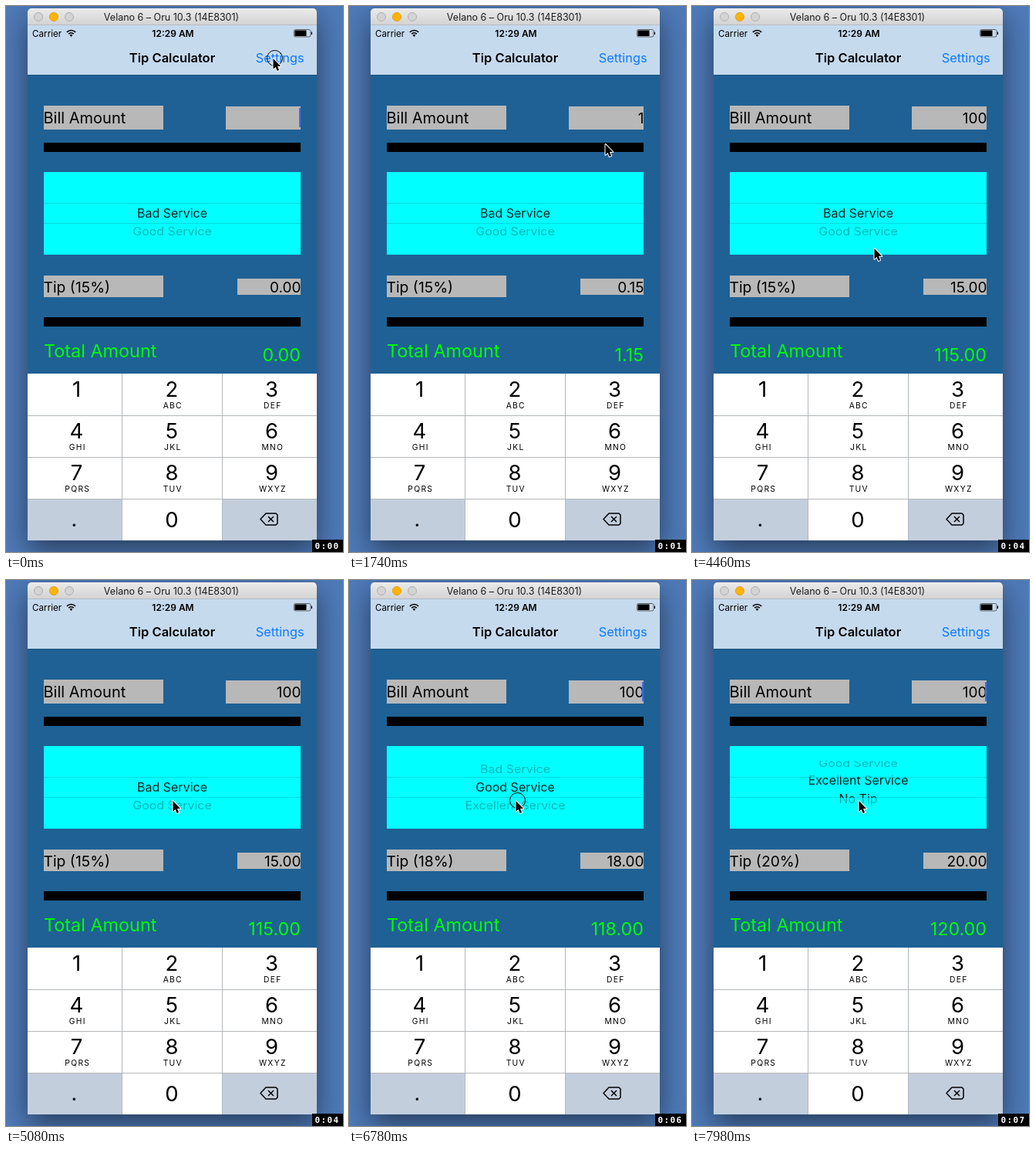
An HTML page with a canvas that plays this animation: 437x707 px, repeating every 8 s.

```html
<!DOCTYPE html>
<html lang="en">
<head>
<meta charset="utf-8">
<title>Tip Calculator</title>
<style>
  html, body { margin: 0; width: 100%; height: 100%; overflow: hidden; background: #4c78b6; }
  canvas { display: block; width: 437px; height: 707px; }
</style>
</head>
<body>
<canvas id="stage" width="437" height="707"></canvas>
<script>
const ctx = document.getElementById('stage').getContext('2d');
const LOOP = 8000;
const SANS = 'Inter, "Open Sans", sans-serif';
const BLUE = '#1f6195', GREY = '#b8b8b8', BAR = '#c6daee', KEY = '#c3cedd';
const ROWS = ['Bad Service', 'Good Service', 'Excellent Service', 'No Tip'];
const RATES = [15, 18, 20];

const BILL = '100', TYPE_START = 1740, TYPE_GAP = 260;
const TAPS = [5530, 6770, 7800];
const PRESS = 75, SCROLL = 250;
const MOVES = [
  { start: 330, end: 900, from: [346, 67], bend: [193, 165], to: [332, 178] },
  { start: 3910, end: 4460, from: [332, 178], bend: [284, 245], to: [236, 313] },
  { start: 4640, end: 5100, from: [236, 313], bend: [226, 299], to: [216, 285] }
];

const clamp = v => Math.max(0, Math.min(1, v));
const ease = v => v < .5 ? 2 * v * v : 1 - 2 * (1 - v) * (1 - v);

function rect(x, y, w, h, color) {
  ctx.fillStyle = color;
  ctx.fillRect(x, y, w, h);
}

function text(str, x, y, size, color = '#000', align = 'left', weight = 400, spacing = 0, family = SANS) {
  ctx.font = `${weight} ${size}px ${family}`;
  ctx.letterSpacing = spacing + 'px';
  ctx.textAlign = align;
  ctx.fillStyle = color;
  ctx.fillText(str, x, y);
}

function circle(x, y, r, fill, stroke) {
  ctx.beginPath();
  ctx.arc(x, y, r, 0, Math.PI * 2);
  if (fill) { ctx.fillStyle = fill; ctx.fill(); }
  if (stroke) { ctx.strokeStyle = stroke; ctx.lineWidth = 1; ctx.stroke(); }
}

function polyline(points, closed) {
  ctx.beginPath();
  points.forEach(([x, y]) => ctx.lineTo(x, y));
  if (closed) ctx.closePath();
}

function drawWindow() {
  rect(0, 0, 437, 707, '#4e7ab8');
  ctx.save();
  ctx.shadowColor = 'rgba(0,0,0,.5)';
  ctx.shadowBlur = 36;
  ctx.shadowOffsetY = 13;
  ctx.beginPath();
  ctx.roundRect(28, 3, 375, 689, [5, 5, 0, 0]);
  ctx.fillStyle = BLUE;
  ctx.fill();
  ctx.restore();

  const grad = ctx.createLinearGradient(0, 3, 0, 24);
  grad.addColorStop(0, '#ebebeb');
  grad.addColorStop(1, '#d3d3d3');
  ctx.beginPath();
  ctx.roundRect(28, 3, 375, 22, [5, 5, 0, 0]);
  ctx.fillStyle = grad;
  ctx.fill();
  circle(42, 14, 5.5, '#d3d3d3', '#b0b0b0');
  circle(62, 14, 5.5, '#ffb400', '#e09e1f');
  circle(82, 14, 5.5, '#d3d3d3', '#b0b0b0');
  text('Velano 6 – Oru 10.3 (14E8301)', 214.5, 19, 12.5, '#1c1c1c', 'center');
}

function drawBars() {
  rect(28, 24, 375, 65, BAR);
  rect(28, 24, 375, 1, '#b4bcc6');
  rect(28, 89, 375, 1, 'rgba(0,0,0,.15)');
  text('Carrier', 34, 39.5, 11.7);
  text('12:29 AM', 216.5, 39.5, 12, '#000', 'center', 600);

  ctx.strokeStyle = '#000';
  ctx.lineWidth = 1.7;
  for (const r of [4.7, 8]) {
    ctx.beginPath();
    ctx.arc(84.5, 39.5, r, -Math.PI * .75, -Math.PI * .25);
    ctx.stroke();
  }
  ctx.beginPath();
  ctx.moveTo(84.5, 40);
  ctx.arc(84.5, 39.5, 2.6, -Math.PI * .75, -Math.PI * .25);
  ctx.fillStyle = '#000';
  ctx.fill();

  ctx.strokeStyle = '#444';
  ctx.lineWidth = .8;
  ctx.beginPath();
  ctx.roundRect(373.5, 30.5, 21.5, 9.5, 2);
  ctx.stroke();
  rect(374.5, 31.5, 15, 7.5, '#000');
  rect(395.8, 33.5, 1.2, 3.5, '#000');

  text('Tip Calculator', 215.5, 73, 16.5, '#000', 'center', 600);
  text('Settings', 386.5, 73, 16.3, '#0a7aff', 'right');
}

// Solid after input, then blinking
function caretAlpha(t) {
  const age = t < TYPE_START ? t + 70 : t - 1950;
  if (age < 870) return age < 0 ? 0 : 1;
  const phase = (age - 870) % 1060;
  return phase < 580 ? 1 - clamp(phase / 80) : clamp((phase - 580) / 80);
}

function drawForm(t) {
  const typed = Math.max(0, Math.floor((t - TYPE_START) / TYPE_GAP) + 1);
  const bill = BILL.slice(0, typed);
  const rate = RATES[TAPS.filter(tap => t >= tap + PRESS + SCROLL).length];
  const tip = bill * rate / 100;
  rect(49, 129, 155, 31, GREY);
  rect(285, 130, 97, 30, GREY);
  rect(49, 177, 333, 12, '#000');
  rect(49, 349, 155, 28, GREY);
  rect(300, 353, 82, 21, GREY);
  rect(49, 403, 333, 12, '#000');
  text('Bill Amount', 48.5, 152, 20);
  text(bill, 382.5, 152, 19, '#000', 'right');
  text(`Tip (${rate}%)`, 48.5, 370.5, 19.3);
  text(tip.toFixed(2), 382.5, 370.5, 19, '#000', 'right');
  text('Total Amount', 49, 454.5, 23.4, '#0f0');
  text((+bill + tip).toFixed(2), 382, 460, 23.3, '#0f0', 'right');

  ctx.globalAlpha = caretAlpha(t);
  rect(380, 132, 2, 25, '#426bf2');
  ctx.globalAlpha = 1;
}

function drawRows(pos, top, bottom, color) {
  ctx.save();
  ctx.beginPath();
  ctx.rect(49, top, 333, bottom - top);
  ctx.clip();
  ROWS.forEach((name, i) => {
    const angle = (i - pos) * 28 * Math.PI / 180;
    if (Math.abs(angle) > 1.2) return;
    ctx.save();
    ctx.translate(215.5, 268 + 50 * Math.sin(angle));
    ctx.scale(1, Math.cos(angle));
    text(name, 0, 5.8, 16, color, 'center');
    ctx.restore();
  });
  ctx.restore();
}

function drawPicker(t) {
  const pos = TAPS.reduce((sum, tap) => sum + ease(clamp((t - tap - PRESS) / SCROLL)), 0);
  const faint = 'rgba(0,60,60,.38)', line = 'rgba(0,90,100,.22)';
  rect(49, 215, 333, 107, '#0ff');
  drawRows(pos, 234, 255, faint);
  drawRows(pos, 255, 282, '#052626');
  drawRows(pos, 282, 303, faint);
  rect(49, 255, 333, 1, line);
  rect(49, 281, 333, 1, line);
}

function drawKeypad() {
  const cols = [91.5, 215, 344.5];
  const letters = ['', 'ABC', 'DEF', 'GHI', 'JKL', 'MNO', 'PQRS', 'TUV', 'WXYZ'];
  rect(28, 476, 375, 216, '#fff');
  rect(28, 639, 122, 53, KEY);
  rect(281, 639, 122, 53, KEY);
  for (const y of [530, 584, 638]) rect(28, y, 375, 1, '#b5b8bc');
  for (const x of [150, 280]) rect(x, 476, 1, 216, '#b5b8bc');
  letters.forEach((label, i) => {
    const x = cols[i % 3], y = 506 + 54 * Math.floor(i / 3);
    text(String(i + 1), x, y, 27.5, '#000', 'center');
    text(label, x + 1.3, y + 15, 10.3, '#000', 'center', 400, 1.3);
  });
  text('0', 215, 675, 27.5, '#000', 'center');
  text('.', 88.5, 674, 27, '#000', 'center');

  ctx.strokeStyle = '#000';
  ctx.lineWidth = 1.5;
  ctx.lineJoin = 'round';
  polyline([[330, 664.5], [337, 657], [350, 657], [352, 659], [352, 670], [350, 672], [337, 672]], true);
  ctx.stroke();
  for (const d of [-3.5, 3.5]) {
    polyline([[343.5 - d, 661], [343.5 + d, 668]]);
    ctx.stroke();
  }
}

function cursorAt(t) {
  const move = MOVES.findLast(m => t >= m.start) || MOVES[0];
  const k = ease(clamp((t - move.start) / (move.end - move.start)));
  return [0, 1].map(i => Math.round(
    (1 - k) ** 2 * move.from[i] + 2 * k * (1 - k) * move.bend[i] + k * k * move.to[i]));
}

function drawCursor(t) {
  const [x, y] = cursorAt(t);
  const pressed = [-15, ...TAPS].some(tap => t >= tap && t < tap + PRESS);
  if (pressed) circle(x + 2.5, y + .5, 10, null, '#000');
  const arrow = [[0, 0], [0, 13.7], [3.1, 10.9], [5.2, 16], [7.6, 15], [5.5, 10], [9.7, 10]];
  polyline(arrow.map(([a, b]) => [x + .5 + a, y + 1 + b]), true);
  ctx.lineJoin = 'round';
  ctx.lineWidth = 2;
  ctx.strokeStyle = '#fff';
  ctx.stroke();
  ctx.fillStyle = '#000';
  ctx.fill();
}

function drawTimer(t) {
  const sec = Math.max(0, Math.floor((t - 970) / 1056) + 1);
  rect(397, 691, 40, 16, '#000');
  text('0:0' + sec, 400.5, 702.5, 11, '#fff', 'left', 700, 1.4, '"DejaVu Sans Mono", monospace');
}

const begin = performance.now();

function frame() {
  const t = (performance.now() - begin) % LOOP;
  drawWindow();
  drawBars();
  drawForm(t);
  drawPicker(t);
  drawKeypad();
  drawCursor(t);
  drawTimer(t);
  requestAnimationFrame(frame);
}

frame();
</script>
</body>
</html>
```
